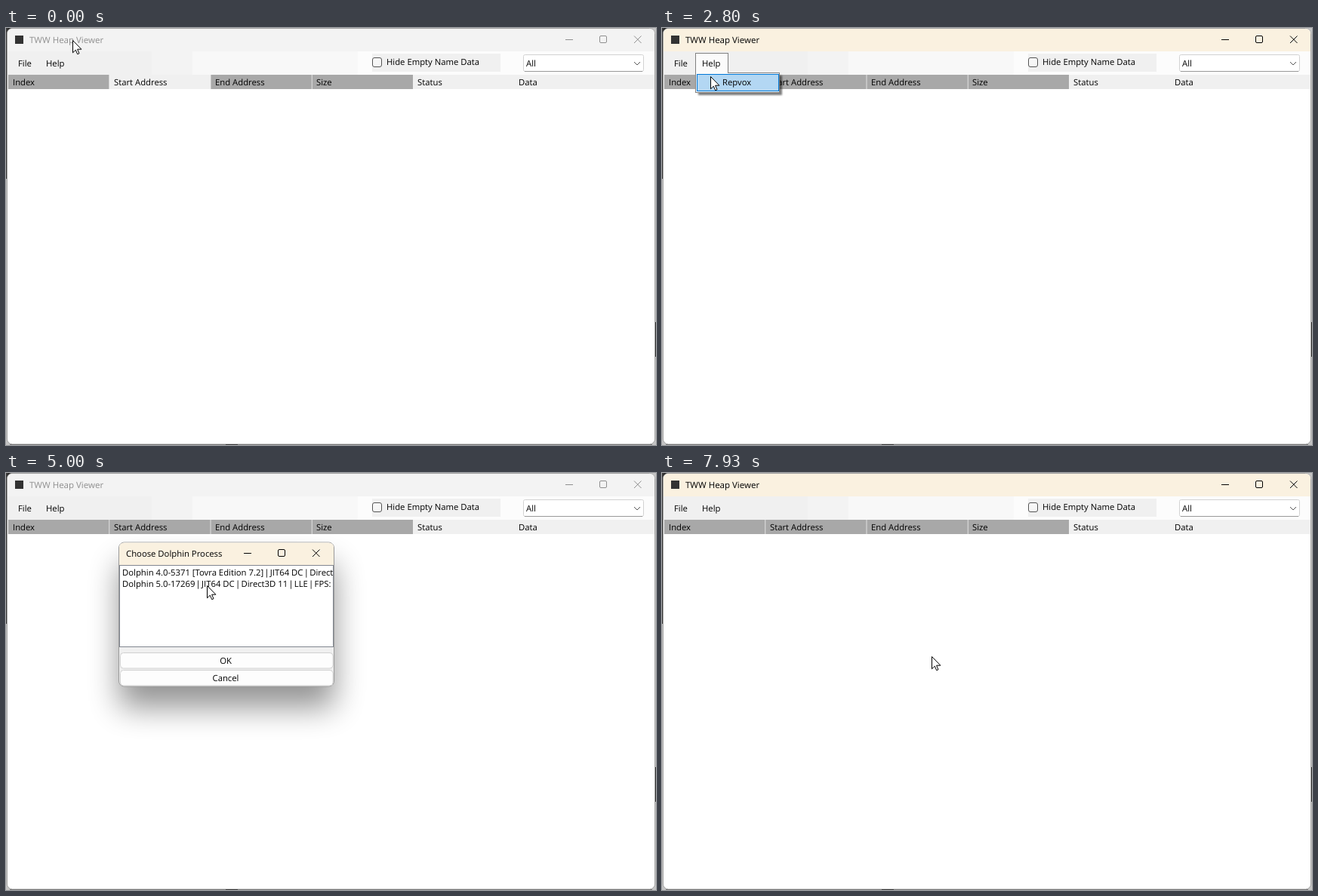
Write an HTML page that moves like this. It is 861 px wide and 553 px high and loops after 8000 ms.

```html
<!DOCTYPE html>
<html lang="en">
<head>
<meta charset="utf-8">
<title>TWW Heap Viewer</title>
<style>
html, body { margin: 0; width: 861px; height: 553px; overflow: hidden; background: #fff; }
svg { display: block; }
text { font: 11.3px "Open Sans", "Noto Sans", sans-serif; text-rendering: geometricPrecision; white-space: pre; }
.caption { font-size: 11.5px; }
</style>
</head>
<body>
<svg id="stage" width="861" height="553" viewBox="0 0 861 553"></svg>
<script>
const rect = (x, y, w, h, fill, more = '') =>
  `<rect x="${x}" y="${y}" width="${w}" height="${h}" fill="${fill}" ${more}/>`;
const text = (x, y, s, more = '') => `<text x="${x}" y="${y}" ${more}>${s}</text>`;
const line = (d, more = '') => `<path d="${d}" fill="none" ${more}/>`;
const group = (id, body, more = '') => `<g id="${id}" ${more}>${body}</g>`;
const edge = (color, r = 0) => `stroke="${color}" rx="${r}"`;

// Minimise, maximise and close glyphs, given the left end of the first one
const buttons = (x, y, step) =>
  line(`M${x} ${y + .5}h10`) + rect(x + step + .5, y - 4.5, 9, 9, 'none', 'rx="1.5"') +
  line(`M${x + 2 * step + 1} ${y - 4.5}l9.5 9.5m0 -9.5l-9.5 9.5`);

const chrome = () =>
  rect(0, 0, 861, 553, '#c4c4c4') + rect(0, 0, 141, 8, '#2a2a2a') + rect(141, 0, 460, 1, '#777') +
  rect(0, 0, 2, 200, '#3a3a3a') + rect(859, 390, 2, 46, '#333') +
  rect(1.5, .5, 858, 551.5, '#fff', edge('#a2a2a2', 7)) +
  line('M5 552.5H856', 'stroke="#777"') + rect(291, 552, 16, 1, '#333') +
  line('M2 31V8Q2 1 9 1H852Q859 1 859 8V31Z', 'style="fill:#f3f3f3"') +
  line('M2 31V8Q2 1 9 1H852Q859 1 859 8V31Z', 'id="cream" style="fill:#faf1e0"') +
  rect(12, 10, 11, 11, '#333') +
  text(31, 20, 'TWW Heap Viewer', 'id="title" class="caption"') +
  group('controls', buttons(741, 15, 45));

const toolbar = () =>
  rect(2, 31, 191, 31, '#f0f0f0') + rect(193, 31, 54, 31, '#f3f3f3') +
  rect(247, 31, 219, 31, '#f8f8f8') + rect(466, 31, 393, 31, '#fcfcfc') +
  rect(485, 34, 170, 24, '#f0f0f0') +
  rect(485.5, 39.5, 12, 12, '#f6f6f6', edge('#555', 2.5)) +
  text(504, 49, 'Hide Empty Name Data') +
  rect(685.5, 35.5, 159, 22, '#fff', edge('#d2d2d2', 2)) +
  line('M687 57.5H843', 'stroke="#999"') + text(689, 51, 'All') +
  line('M832 45l4 4 4 -4', 'stroke="#555"');

const columns = () => rect(2, 62, 857, 19, '#f0f0f0') +
  ['Index', 'Start Address', 'End Address', 'Size', 'Status', 'Data'].map((name, i) =>
    (i < 4 ? rect(3 + i * 134.2, 62, 133.4, 19, '#a8a8a8', i == 1 ? 'id="visited"' : '') : '') +
    text(9 + i * 134, 76, name)).join('');

const dropdown = (id, x, tab, width, items) => group(id,
  rect(x + 4, 63, width, items.length * 22 + 4, '#000', 'opacity=".5" filter="url(#soft)"') +
  rect(x + .5, 59.5, width, items.length * 22 + 4, '#fbfbfb', edge('#808080')) +
  rect(x + .5, 33.5, tab, 26, '#fbfbfb', edge('#808080')) +
  rect(x + 1, 58, tab - 1, 3, '#fbfbfb') +
  rect(x + 2.5, 61.5, width - 3, 22, '#b3d7f3', `id="${id}Hot" stroke="#0078d7"`) +
  items.map((s, i) => text(x + 36, 76 + i * 22, s)).join(''));

const menus = () =>
  rect(7.5, 33.5, 36, 25, '#b3d7f3', 'id="fileHover" stroke="#3b6d9c"') +
  dropdown('fileMenu', 7, 36, 183, ['Attach to Dolphin', 'Refresh', 'Export', 'Exit']) +
  dropdown('helpMenu', 44, 43, 111, ['Repvox']) +
  text(16, 51, 'File') + text(53, 51, 'Help');

// The vertical bar is set tighter than the font's own advance
const process = (y, s, more = '') => text(154, y,
  s.replace(/\|/g, '<tspan dx="-1.7">|</tspan><tspan dx="-1.7"> </tspan>').replace(/<\/tspan> /g, '</tspan>'),
  'clip-path="url(#list)" ' + more);

const dialog = () => group('dialog',
  rect(150, 120, 285, 191, '#000', 'id="shadow" rx="8" filter="url(#wide)"') +
  rect(149.5, 92, 285, 191, '#f0f0f0', edge('#9a9a9a', 7)) +
  line('M150 122V99Q150 92.5 157 92.5H427Q434 92.5 434 99V122Z', 'style="fill:#f3f3f3"') +
  line('M150 122V99Q150 92.5 157 92.5H427Q434 92.5 434 99V122Z', 'id="dialogCream" style="fill:#faf1e0"') +
  text(159, 111, 'Choose Dolphin Process', 'id="dialogTitle"') +
  group('dialogControls', buttons(315, 106, 45)) +
  rect(150.5, 122.5, 283, 108, '#fff', edge('#828790')) +
  rect(152, 124, 280, 15, '#0078d7', 'id="selected"') +
  process(136, 'Dolphin 4.0-5371 [Tovra Edition 7.2] | JIT64 DC | Direct3D 11', 'id="first"') +
  process(151, 'Dolphin 5.0-17269 | JIT64 DC | Direct3D 11 | LLE | FPS:') +
  rect(151.5, 238.5, 281.5, 20.5, '#fdfdfd', 'id="ok" rx="4"') +
  text(291, 252.5, 'OK', 'text-anchor="middle"') +
  rect(151.5, 261.5, 281.5, 20.5, '#fdfdfd', edge('#d0d0d0', 4)) +
  text(291, 275.5, 'Cancel', 'text-anchor="middle"'));

const stage = document.getElementById('stage');
stage.innerHTML = `<defs>
  <filter id="soft"><feGaussianBlur stdDeviation="1.3"/></filter>
  <filter id="wide" x="-50%" y="-50%" width="200%" height="200%"><feGaussianBlur stdDeviation="20"/></filter>
  <clipPath id="list"><rect x="151" y="123" width="282" height="107"/></clipPath></defs>` +
  chrome() + toolbar() + columns() + menus() + dialog() +
  `<path id="cursor" d="M.5 .5V16.8L4.3 13.2 6.7 18.7 9 17.7 6.6 12.2H11.9Z" fill="#fff" stroke="#000"/>`;

const $ = id => document.getElementById(id);
const set = (id, attrs) => { for (const k in attrs) $(id).setAttribute(k, attrs[k]); };
const show = (id, on) => set(id, { visibility: on ? 'visible' : 'hidden' });
const ramp = (t, a, b) => Math.min(1, Math.max(0, (t - a) / (b - a)));

// time, x, y
const path = [
  [0, 88, 16], [400, 274, 200], [870, 23, 53], [1870, 23, 53], [1930, 24, 51],
  [2330, 24, 51], [2530, 58, 48], [2670, 64, 64], [2870, 64, 64], [3200, 33, 52],
  [3330, 33, 52], [3400, 32, 52], [3670, 32, 52], [3870, 47, 69], [4200, 47, 69],
  [4930, 266, 148], [5000, 266, 149], [5200, 266, 149], [5400, 265, 146], [5670, 265, 146],
  [6000, 268, 135], [6200, 268, 135], [6530, 313, 241], [7400, 313, 241],
  [7730, 354, 243], [7870, 354, 243], [7930, 357, 243], [8000, 357, 243]];

function pointer(t) {
  const i = path.findIndex(p => p[0] > t), [a, x, y] = path[i - 1], [b, u, v] = path[i];
  const p = ramp(t, a, b), e = p * p * (3 - 2 * p);
  return [Math.round(x + (u - x) * e), Math.round(y + (v - y) * e)];
}

function draw(t) {
  const active = t >= 1130 && t < 4130 || t >= 6800;
  const ink = active ? '#000' : '#8f8f8f';
  set('cream', { opacity: ramp(t, 1070, 1400) - ramp(t, 4130, 4400) + ramp(t, 6800, 7130) });
  set('title', { fill: ink });
  set('controls', { stroke: ink, fill: 'none' });
  show('visited', t >= 200);

  const fileOpen = t >= 2070 && t < 2530 || t >= 3130 && t < 4130;
  const helpOpen = t >= 2530 && t < 3130;
  show('fileHover', t >= 800 && t < 2070);
  show('fileMenu', fileOpen);
  show('fileMenuHot', fileOpen && t >= 3800);
  show('helpMenu', helpOpen);
  show('helpMenuHot', helpOpen && t >= 2600 && t < 3000);

  const rise = 1 - (1 - ramp(t, 4130, 4400)) ** 2, fall = ramp(t, 6800, 7070);
  const scale = .82 + .18 * rise - .07 * fall * fall;
  const focus = t >= 4330 && t < 6800, dialogInk = focus ? '#000' : '#8f8f8f';
  show('dialog', rise > 0 && fall < 1);
  set('dialog', {
    opacity: rise * (1 - fall),
    transform: `translate(223 152) scale(${scale}) translate(-223 -152)`
  });
  set('shadow', { opacity: focus ? .42 : .24 });
  set('dialogCream', { opacity: focus ? ramp(t, 4260, 4530) : 0 });
  set('dialogTitle', { fill: dialogInk });
  set('dialogControls', { stroke: dialogInk, fill: 'none' });

  const picked = t >= 5930, hot = t >= 6460;
  set('selected', { opacity: +picked });
  set('first', { fill: picked ? '#fff' : '#000' });
  set('ok', {
    fill: hot ? '#e0eef9' : '#fdfdfd', stroke: hot || picked ? '#0078d4' : '#d0d0d0',
    'stroke-width': hot ? 1.4 : 1
  });
  set('cursor', { transform: `translate(${pointer(t)})` });
}

// The screen is refreshed fifteen times a second
function tick(now) {
  const step = Math.floor((now % 8000 + 5) * .015) % 120;
  draw(Math.round(step / .15) * 10);
  requestAnimationFrame(tick);
}
const start = performance.now();
const loop = now => tick(Math.max(0, now - start));
(function run() { loopFrame(performance.now()); })();
function loopFrame(now) {
  const step = Math.floor((Math.max(0, now - start) % 8000 + 5) * .015) % 120;
  draw(Math.round(step / .15) * 10);
  requestAnimationFrame(loopFrame);
}
</script>
</body>
</html>
```
